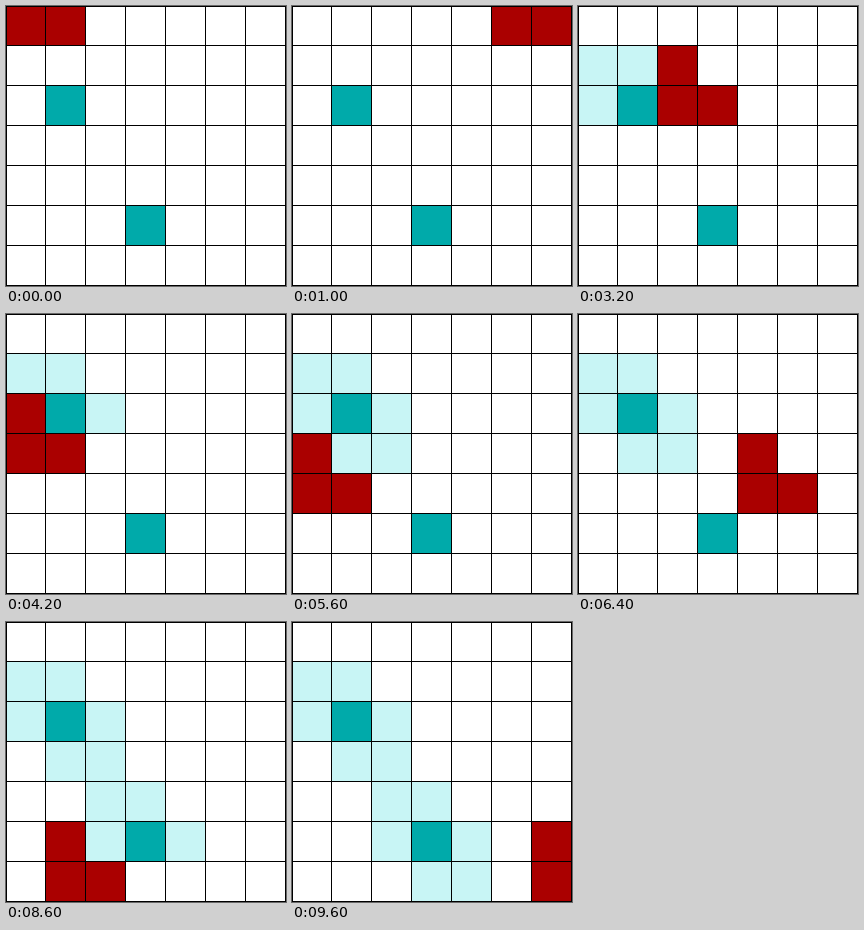
An HTML page with a canvas for the animation above (9800 ms loop, 280 by 280 pixels).

```html
<!DOCTYPE html>
<html lang="en">
<head>
<meta charset="utf-8">
<title>Dilation by an L-shaped element</title>
<style>
  html, body { margin: 0; width: 100%; height: 100%; overflow: hidden; background: #fff; }
  canvas { display: block; }
</style>
</head>
<body>
<canvas id="stage" width="280" height="280"></canvas>
<script>
const ctx = document.getElementById('stage').getContext('2d');
const N = 7, STEP = 200, STEPS = N * N;
const seeds = [[2, 1], [5, 3]];
const element = [[0, 0], [-1, 0], [0, 1]];

const line = i => Math.floor(i * 279 / N);
const isSeed = ([r, c]) => seeds.some(([sr, sc]) => sr === r && sc === c);

// Cells covered by the element when its corner is at scan position k
const cover = k => element.map(([dr, dc]) => [Math.floor(k / N) + dr, k % N + dc]);

function fillCell([r, c], color) {
  if (r < 0 || c >= N) return;
  const x = line(c), y = line(r);
  ctx.fillStyle = color;
  ctx.fillRect(x, y, line(c + 1) - x, line(r + 1) - y);
}

function draw(step) {
  ctx.fillStyle = '#fff';
  ctx.fillRect(0, 0, 280, 280);

  // Every past position that touched a seed leaves its shape behind
  for (let k = 0; k <= step; k++) {
    const cells = cover(k);
    if (cells.some(isSeed)) cells.forEach(cell => fillCell(cell, '#c8f5f5'));
  }
  seeds.forEach(cell => fillCell(cell, '#00aaaa'));
  cover(step).forEach(cell => fillCell(cell, '#aa0000'));

  ctx.fillStyle = '#000';
  for (let i = 0; i <= N; i++) {
    ctx.fillRect(line(i), 0, 1, 280);
    ctx.fillRect(0, line(i), 280, 1);
  }
}

const start = performance.now();
function tick() {
  draw(Math.floor((performance.now() - start) / STEP) % STEPS);
  requestAnimationFrame(tick);
}
tick();
</script>
</body>
</html>
```
